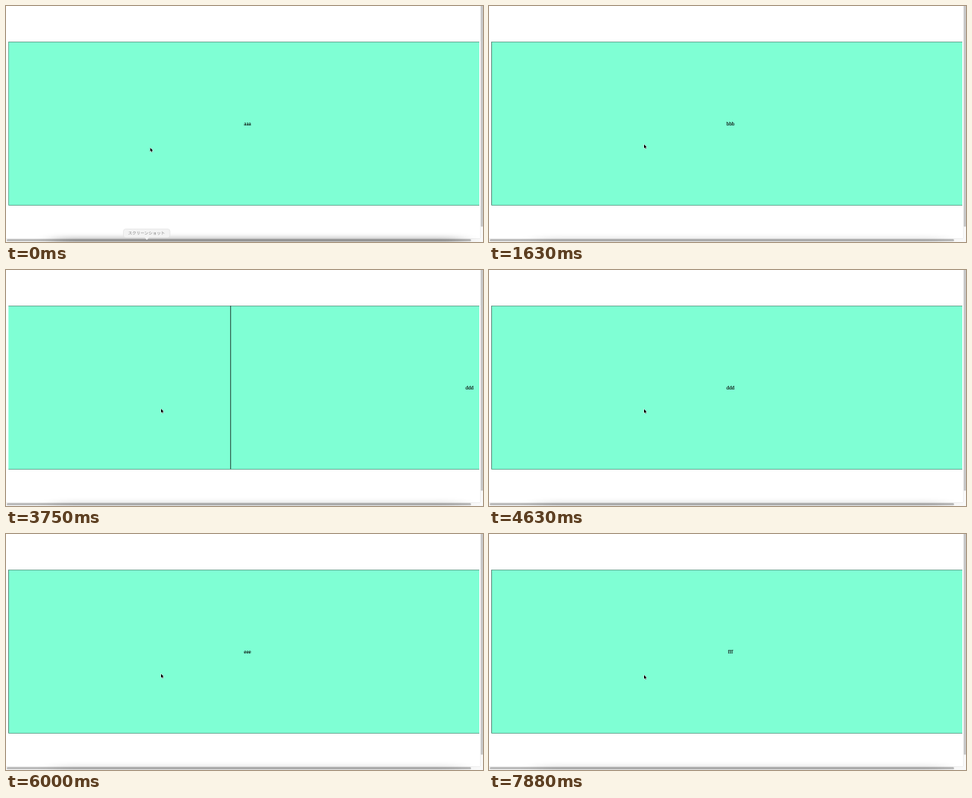
These frames come from a looping animation (640x318 px, 8000 ms). An HTML page:

```html
<!DOCTYPE html>
<html lang="ja">
<head>
<meta charset="utf-8">
<title>Snap carousel</title>
<style>
  html, body { margin: 0; width: 100%; height: 100%; overflow: hidden; background: #fff; }
  svg { display: block; width: 640px; height: 318px; }
  text { text-anchor: middle; text-rendering: geometricPrecision; }
  .label { font: 7.2px "Liberation Serif", serif; stroke: #000; stroke-width: .12; }
  .border { fill: none; stroke: #000; }
  #tip text { font: 5.55px "Noto Sans CJK JP", "Noto Sans CJK", sans-serif; fill: #808080; }
</style>
</head>
<body>
<svg viewBox="0 0 640 318">
  <defs>
    <clipPath id="view"><rect x="3.3" y="48.3" width="631.7" height="220.45"/></clipPath>
    <filter id="soft" x="-20%" y="-200%" width="140%" height="500%"><feGaussianBlur stdDeviation="14 3.5"/></filter>
  </defs>

  <g clip-path="url(#view)">
    <rect x="3" y="48" width="632" height="221" fill="#7fffd4"/>
    <g id="track"></g>
  </g>

  <rect y="313" width="640" height="5" fill="#f9f9f9"/>
  <rect y="313" width="636" height=".6" fill="#e8e8e8"/>
  <rect x="1" y="314" width="623" height="3" rx="1.5" fill="#bbb"/>
  <rect x="636" width="4" height="318" fill="#f9f9f9"/>
  <rect x="636" width=".6" height="313" fill="#e8e8e8"/>
  <rect x="637.2" y="-4" width="2.6" height="301.5" rx="1.3" fill="#c1c1c1"/>
  <rect id="shadow" x="65" y="312" width="545" height="10" filter="url(#soft)"/>

  <g id="tip">
    <path d="M160.5 300.5H217a3 3 0 0 1 3 3V309a3 3 0 0 1-3 3H192L189 315 186 312H160.5a3 3 0 0 1-3-3V303.5a3 3 0 0 1 3-3Z" fill="#f3f3f3" stroke="#ddd" stroke-width=".6"/>
    <text x="188.5" y="308.3">スクリーンショット</text>
  </g>

  <path id="cursor" d="M0 0V5.2L1.2 4.1 2 6 2.9 5.6 2.1 3.8H3.7Z" stroke="#fff" stroke-width=".9" paint-order="stroke"/>
</svg>
<script>
const LOOP = 8000, STEP = 125, GLIDE = 1100;
const LEFT = 3.3, TOP = 48.3, WIDTH = 641.4, HEIGHT = 220.45, LINE = 0.45;
const labels = ["aaa", "bbb", "ccc", "ddd", "eee", "fff"];
const swipes = [542, 2100, 3522, 4659, 6056]; // start times in ms

const get = id => document.getElementById(id);
const progress = (t, start, length) => Math.min(1, Math.max(0, (t - start) / length));
const mix = (a, b, p) => a + (b - a) * p;
const half = v => Math.round(v * 2) / 2;

// Share of a slide covered: fast at first, then a long slow stop
const glide = p => 1 - (1 - p) ** 3.3;

get("track").innerHTML = labels.map((label, i) => {
  const x = LEFT + i * WIDTH;
  return `<rect class="border" x="${x + LINE / 2}" y="${TOP + LINE / 2}" width="${WIDTH - LINE}"
      height="${HEIGHT - LINE}" stroke-width="${LINE}"/>
    <text class="label" x="${x + WIDTH / 2}" y="160.9">${label}</text>`;
}).join("");

// The screen refreshes eight times a second, on 10 ms ticks
function tick(time) {
  const start = k => Math.round(k * STEP / 10) * 10;
  const k = Math.floor(time / STEP);
  return start(time < start(k) ? k - 1 : k);
}

function draw(now) {
  const t = tick(now % LOOP);
  const slides = swipes.reduce((sum, start) => sum + glide(progress(t, start, GLIDE)), 0);
  get("track").setAttribute("transform", `translate(${-slides * WIDTH} 0)`);

  // The pointer moves in, then sinks a little
  const arrive = glide(progress(t, 0, 700));
  const x = mix(193.7, 207.8, arrive);
  const y = mix(191, 186.5 + 3.4 * (t / LOOP) ** 2, arrive);
  get("cursor").setAttribute("transform", `translate(${half(x)} ${half(y)})`);

  const dock = 1 - progress(t, 100, 350);
  get("tip").setAttribute("opacity", dock);
  get("shadow").setAttribute("opacity", 0.1 + 0.15 * dock);
}

let origin;
function frame(now) {
  origin ??= now;
  draw(now - origin);
  requestAnimationFrame(frame);
}
draw(0);
requestAnimationFrame(frame);
</script>
</body>
</html>
```
